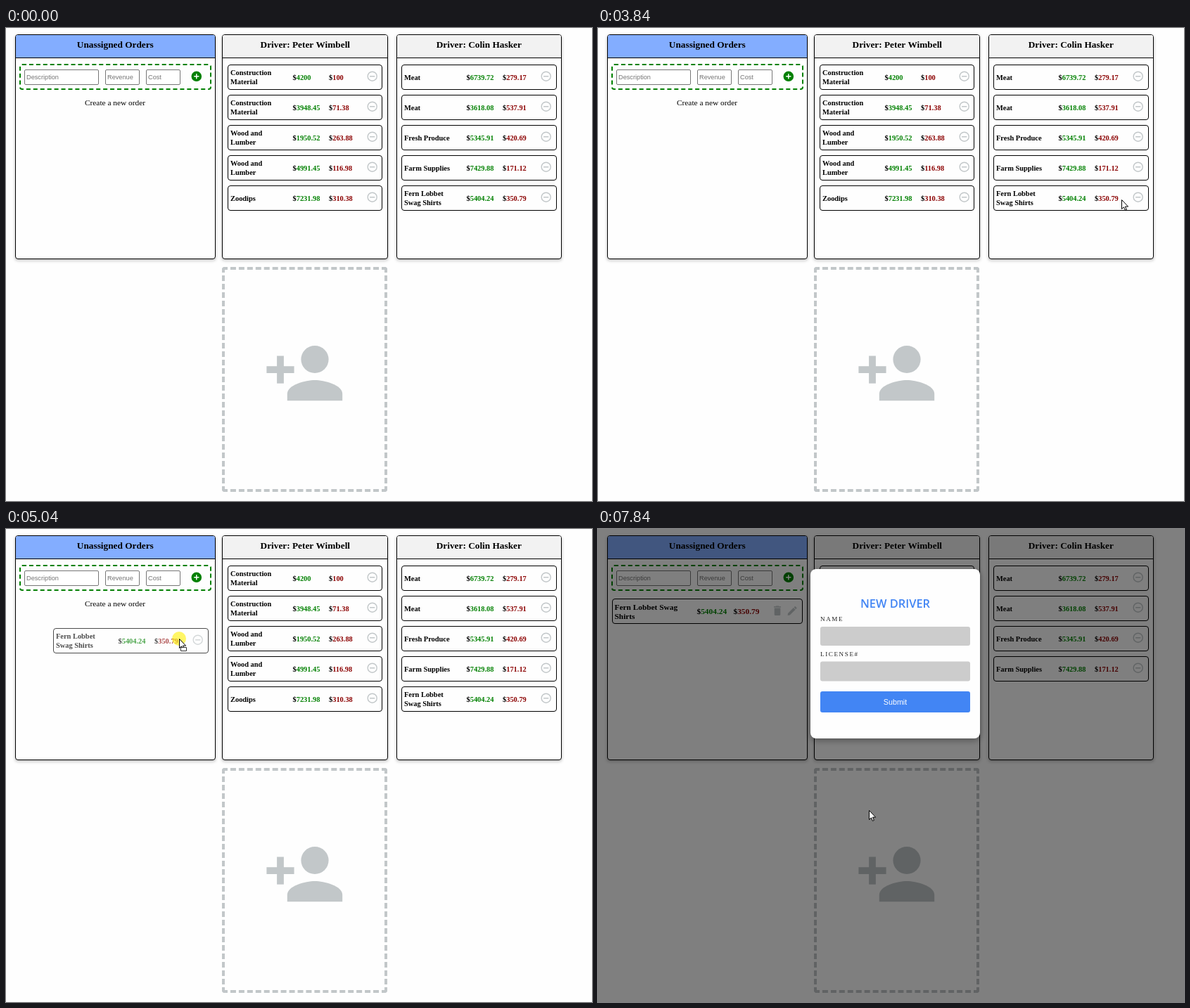
Write an HTML page with a canvas that moves like this. It is 833 by 673 pixels and loops after 8000 ms.

```html
<!DOCTYPE html>
<html lang="en">
<head>
<meta charset="utf-8">
<title>Order board</title>
<style>
  html, body { margin: 0; width: 100%; height: 100%; overflow: hidden; background: #fefefe; }
  div, canvas { position: absolute; box-sizing: border-box; }
  canvas { left: 0; top: 0; }
  .col { left: 307px; top: 9px; width: 236px; height: 320px; border: 1px solid #000; border-radius: 4px;
         overflow: hidden; background: #fefefe; box-shadow: 0 2px 4px rgba(0,0,0,.25); }
  .col div { left: 0; top: 0; width: 100%; height: 33px; background: #f2f2f2; border-bottom: 1px solid #000; }
  .col.pool { left: 13px; width: 285px; }
  .col.pool div { background: #83adff; }
  .col.last { left: 555px; width: 235px; }
  #form { left: 19px; top: 51px; width: 273px; height: 37px; border: 2px dashed #008000; border-radius: 4px; }
  #add { left: 307px; top: 340px; width: 235px; height: 320px; border: 4px dashed; border-radius: 4px; }
</style>
</head>
<body>
<div class="col pool"><div></div></div>
<div class="col"><div></div></div>
<div class="col last"><div></div></div>
<div id="form"></div>
<div id="add"></div>
<canvas id="stage" width="833" height="673"></canvas>
<script>
const g = document.getElementById('stage').getContext('2d');
const addBox = document.getElementById('add');
const LOOP = 8000, ENTER = 320, GRAB = 4140, DRAG = 4190, DROP = 5250, HOVER = 7480, MODAL = 7840;
const SERIF = '"Liberation Serif", "Times New Roman", serif';
const SANS = '"Liberation Sans", Arial, sans-serif';
const GREY = '#c2c7c9', GREEN = '#008000', RED = '#8b0000', BLUE = '#4285f4';

const order = s => {
  const [name, rev, cost] = s.split('|');
  return { lines: name.split('/'), rev, cost };
};
const left = [
  'Construction/Material|4200|100',
  'Construction/Material|3948.45|71.38',
  'Wood and/Lumber|1950.52|263.88',
  'Wood and/Lumber|4991.45|116.98',
  'Zoodips|7231.98|310.38'
].map(order);
const right = [
  'Meat|6739.72|279.17',
  'Meat|3618.08|537.91',
  'Fresh Produce|5345.91|420.69',
  'Farm Supplies|7429.88|171.12'
].map(order);
const swag = order('Fern Lobbet/Swag Shirts|5404.24|350.79');

const linear = u => u;
const out = u => u * (2 - u);
const glide = u => (u + u * u * (3 - 2 * u)) / 2;

// pointer moves: from, until, to x, to y, easing of x and of y
const moves = [
  [ENTER, 1110, 709, 390, linear, out],
  [1360, 2180, 683, 261],
  [2180, 2420, 679, 258],
  [2420, 3000, 753, 245, linear, out],
  [3020, 3270, 765, 233],
  [3620, 3840, 744, 244],
  [GRAB, 4300, 670, 258],
  [4300, 5060, 246, 155, out, glide],
  [5360, 5510, 246, 170],
  [7020, 7740, 385, 400, glide, glide]
];

function pointer(t) {
  let x = 799, y = 660;
  for (const [from, until, tx, ty, ex = linear, ey = linear] of moves) {
    if (t < from) break;
    const u = Math.min(1, (t - from) / (until - from));
    x += (tx - x) * ex(u);
    y += (ty - y) * ey(u);
  }
  return [Math.round(x), Math.round(y)];
}

function text(s, x, y, font, color = '#000', align = 'left') {
  g.font = font;
  g.fillStyle = color;
  g.textAlign = align;
  g.fillText(s, x, y);
}

function fillBox(x, y, w, h, r, color) {
  g.beginPath();
  g.roundRect(x, y, w, h, r);
  g.fillStyle = color;
  g.fill();
}

function frame(x, y, w, h, r, color) {
  g.beginPath();
  g.roundRect(x + .5, y + .5, w - 1, h - 1, r);
  g.strokeStyle = color;
  g.lineWidth = 1;
  g.stroke();
}

function disc(x, y, r, color) {
  g.beginPath();
  g.arc(x, y, r, 0, Math.PI * 2);
  g.fillStyle = color;
  g.fill();
}

function plus(x, y, size, w, color) {
  g.fillStyle = color;
  g.fillRect(x - size / 2, y - w / 2, size, w);
  g.fillRect(x - w / 2, y - size / 2, w, size);
}

function minus(x, y) {
  g.beginPath();
  g.arc(x, y, 6.5, 0, Math.PI * 2);
  g.moveTo(x - 3.6, y);
  g.lineTo(x + 3.6, y);
  g.strokeStyle = GREY;
  g.lineWidth = 1.4;
  g.stroke();
}

function trash(x, y) {
  g.fillStyle = GREY;
  g.fillRect(x - 5, y - 6.5, 10, 1.5);
  g.fillRect(x - 2.2, y - 7.2, 4.4, 1);
  fillBox(x - 4.3, y - 4, 8.6, 10.5, [0, 0, 1.5, 1.5], GREY);
}

function pencil(x, y) {
  g.save();
  g.translate(x, y);
  g.rotate(-Math.PI / 4);
  fillBox(5.4, -1.9, 2.4, 3.8, .6, GREY);
  g.beginPath();
  g.moveTo(-9, 0);
  g.lineTo(-6.6, -1.9);
  g.lineTo(4.6, -1.9);
  g.lineTo(4.6, 1.9);
  g.lineTo(-6.6, 1.9);
  g.fill();
  g.restore();
}

function person(x, y, color) {
  plus(x - 49, y + 14.6, 39.2, 9.8, color);
  disc(x, y, 19.6, color);
  g.beginPath();
  g.moveTo(x - 39.2, y + 58.8);
  g.lineTo(x - 39.2, y + 49);
  g.bezierCurveTo(x - 39.2, y + 36, x - 13, y + 29.4, x, y + 29.4);
  g.bezierCurveTo(x + 13, y + 29.4, x + 39.2, y + 36, x + 39.2, y + 49);
  g.lineTo(x + 39.2, y + 58.8);
  g.fill();
}

function money(s, x, y, font, color) {
  text('$', x, y, font);
  text(s, x + g.measureText('$').width, y, font, color);
}

function label(lines, x, y, font) {
  const first = lines.length > 1 ? 15 : 22;
  lines.forEach((s, i) => text(s, x, y + first + 13 * i, font));
}

function row(o, x, y, w = 221) {
  const font = 'bold 10.4px ' + SERIF;
  frame(x, y, w, 36, 3.5, '#000');
  label(o.lines, x + 4, y, font);
  money(o.rev, x + 92.5, y + 22, font, GREEN);
  money(o.cost, x + 144, y + 22, font, RED);
  minus(x + 205.7, y + 16.7);
}

function poolRow() {
  const font = 'bold 11.37px ' + SERIF;
  frame(20, 99, 271, 36, 3.5, '#000');
  label(['Fern Lobbet Swag', 'Shirts'], 23.5, 100, font);
  money(swag.rev, 140.5, 121, font, GREEN);
  money(swag.cost, 192.5, 121, font, RED);
  trash(255, 116.6);
  pencil(276, 116.6);
}

function field(x, w, hint) {
  fillBox(x, 59, w, 22, 2, '#fff');
  frame(x, 59, w, 22, 1.5, '#767676');
  text(hint, x + 3, 73, '9.2px ' + SANS, '#757575');
}

function board(t, tint) {
  const head = 'bold 13.3px ' + SERIF;
  text('Unassigned Orders', 155.3, 28, head, '#000', 'center');
  text('Driver: Peter Wimbell', 425.3, 28, head, '#000', 'center');
  text('Driver: Colin Hasker', 672.3, 28, head, '#000', 'center');
  field(26, 106, 'Description');
  field(141, 49, 'Revenue');
  field(199, 49, 'Cost');
  disc(270.8, 68.8, 7.3, GREEN);
  plus(270.8, 68.8, 7.2, 1.5, '#fff');

  left.forEach((o, i) => row(o, 315, 52 + 43 * i, 220));
  right.forEach((o, i) => row(o, 562, 52 + 43 * i));
  if (t < DROP) {
    row(swag, 562, 224);
    text('Create a new order', 155, 110, '11.37px ' + SERIF, '#000', 'center');
  } else poolRow();

  addBox.style.borderColor = tint;
  person(439, 471.5, tint);
}

function modal() {
  g.fillStyle = 'rgba(0,0,0,.5)';
  g.fillRect(0, 0, 833, 673);
  g.save();
  g.shadowColor = 'rgba(0,0,0,.35)';
  g.shadowBlur = 10;
  g.shadowOffsetY = 3;
  fillBox(302, 57, 241, 241, 8, '#fefefe');
  g.restore();
  text('NEW DRIVER', 422.5, 112, '600 16.4px "Open Sans", sans-serif', BLUE, 'center');
  g.letterSpacing = '1.6px';
  text('NAME', 316, 131, '9.1px ' + SERIF, '#222');
  text('LICENSE#', 316, 181, '9.1px ' + SERIF, '#222');
  g.letterSpacing = '0px';
  fillBox(316, 139, 213, 27, 3, '#ccc');
  fillBox(316, 188.5, 213, 28, 3, '#ccc');
  fillBox(316, 231, 213, 30, 3, BLUE);
  text('Submit', 422.5, 250, '10.7px ' + SANS, '#fff', 'center');
}

const arrow = new Path2D('M.5 .5V13.5L3.4 10.8 5.4 15.3 7.4 14.4 5.4 10.1H9.6z');

function drawPointer(t, hover) {
  const [x, y] = pointer(t);
  const held = t >= GRAB && t < DROP;
  if (held) disc(x, y, 10, 'rgba(255,240,0,.6)');
  g.save();
  g.translate(x, y);
  g.fillStyle = '#fff';
  g.fill(arrow);
  g.strokeStyle = hover === 1 ? '#8d968d' : '#000';
  g.lineWidth = 1;
  g.stroke(arrow);
  if (held && t >= DRAG) {
    fillBox(2, 12, 9, 6, 0, '#fff');
    frame(2, 12, 9, 6, 0, '#333');
  }
  g.restore();
}

function draw(t) {
  g.clearRect(0, 0, 833, 673);
  const hover = t < MODAL ? Math.min(1, Math.max(0, (t - HOVER) / 200)) : 0;
  const mix = (a, b) => Math.round(a + (b - a) * hover);
  board(t, `rgb(${mix(194, 201)},${mix(199, 227)},${mix(201, 200)})`);
  if (t >= DRAG && t < DROP) {
    // the carried card trails the pointer a little
    const [x, y] = pointer(t - 50);
    g.globalAlpha = .7;
    row(swag, x - 182, y - 20);
    g.globalAlpha = 1;
  }
  if (t >= MODAL) modal();
  if (t >= ENTER) drawPointer(t, hover);
}

const start = performance.now();
function tick() {
  draw((performance.now() - start) % LOOP);
  requestAnimationFrame(tick);
}
tick();
</script>
</body>
</html>
```
